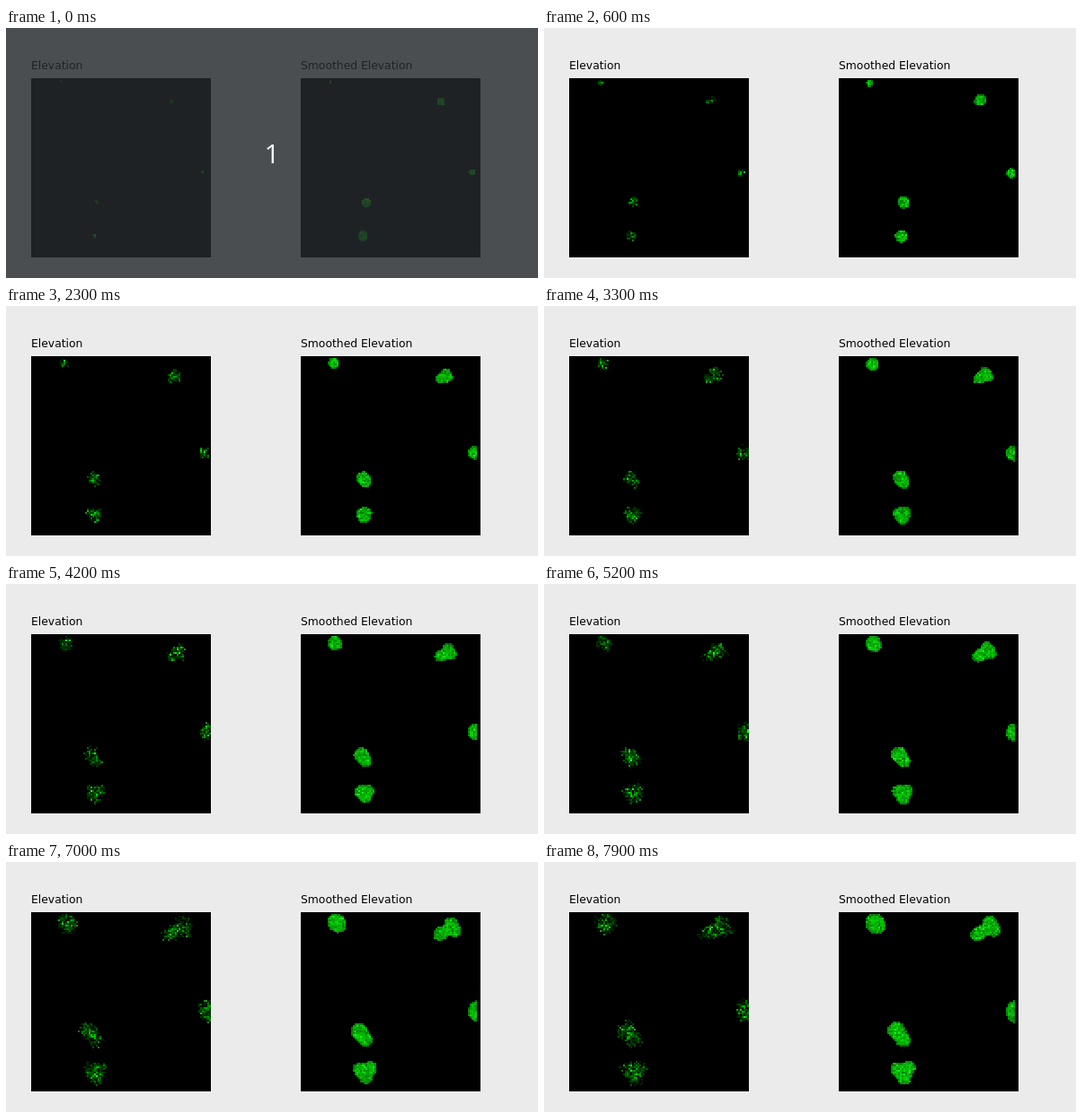
Animation, 592 px wide and 279 px high, one loop 8 s. Source, as an HTML page with a canvas:

```html
<!DOCTYPE html>
<html lang="en">
<head>
<meta charset="utf-8">
<title>Elevation</title>
<style>
  html, body { margin: 0; width: 100%; height: 100%; overflow: hidden; background: #ebebeb; }
  canvas { position: absolute; left: 0; top: 0; }
  .label {
    position: absolute; top: 34px; white-space: nowrap; color: #000;
    font: 12.35px/16px "DejaVu Sans", sans-serif;
  }
  #cover {
    position: absolute; left: 0; top: 0; width: 592px; height: 279px;
    color: #fff; text-align: center;
    font: 30px/279px "Open Sans", sans-serif;
  }
</style>
</head>
<body>
<canvas id="stage" width="592" height="279"></canvas>
<div class="label" style="left:28px">Elevation</div>
<div class="label" style="left:328px">Smoothed Elevation</div>
<div id="cover">1</div>
<script>
const ctx = document.getElementById('stage').getContext('2d');
const cover = document.getElementById('cover');
const STEP = 100, STEPS = 80, FADE_STEPS = 4, FIRST_GROWTH = 6;
const CELL = 2, SIZE = 200, TOP = 56, RAW_LEFT = 28, SMOOTH_LEFT = 328;

// Every blob starts round, then drifts, swells, and gains a long axis (stretch
// along tilt) and three corners (one of them facing point).
const blobs = [
  { from: [33, 4], to: [41, 13], size: [2, 11.4], stretch: 0.06, tilt: 0.9, corner: 0, point: 0 },
  { from: [156, 26], to: [165, 18.5], size: [5, 13.2], stretch: 0.3, tilt: 2.64, corner: 0.24, point: 2.64 },
  { from: [190.5, 105], to: [197, 111], size: [4, 11.7], stretch: 0.08, tilt: 1.57, corner: 0, point: 0 },
  { from: [73, 139], to: [67, 136], size: [5.5, 12.2], stretch: 0.28, tilt: 0.95, corner: 0.08, point: 0.95 },
  { from: [69, 176], to: [72, 178], size: [5.5, 13], stretch: 0.02, tilt: 0, corner: 0.18, point: 1.45 }
];

const lerp = (a, b, mix) => a + (b - a) * mix;

function noise(x, y, seed) {
  let h = Math.imul(x + 11, 374761393) ^ Math.imul(y + 7, 668265263) ^ Math.imul(seed + 3, 1274126177);
  h = Math.imul(h ^ (h >>> 13), 1103515245);
  h = Math.imul(h ^ (h >>> 15), 2246822519);
  return ((h ^ (h >>> 14)) >>> 0) / 4294967296;
}

function fillCell(left, x, y, green, tint) {
  ctx.fillStyle = `rgb(${tint},${Math.min(235, Math.round(green))},${tint})`;
  ctx.fillRect(left + x * CELL, TOP + y * CELL, CELL, CELL);
}

// depth is 0 at the centre of a blob and 1 on its outline.
function drawRawCell(x, y, depth, step, growth) {
  const ragged = depth / lerp(0.6, 1, Math.sqrt(growth)) + (noise(x, y, step + 200) - 0.5) * 0.5;
  const h = noise(x, y, step);
  if (ragged > 1 || h < 0.2) return;
  fillCell(RAW_LEFT, x, y, (20 + 85 * h + 130 * h ** 6) * (1.3 - 0.7 * depth), h > 0.97 ? 40 : 0);
}

function drawSmoothCell(x, y, depth, step) {
  if (depth > 1 || x > 97) return;
  const h = (noise(x, y, step + 600) + noise(x, y, step + 601)) / 2;
  fillCell(SMOOTH_LEFT, x, y, (110 + 135 * h) * (depth > 0.85 ? 0.75 : 1), h > 0.85 ? 30 : 6);
}

function drawBlob(blob, step) {
  const growth = (step / STEPS) ** 0.65;
  const [cx, cy] = blob.from.map((v, i) => lerp(v, blob.to[i], growth));
  const radius = lerp(...blob.size, growth);
  const reach = radius * 1.8;
  const cells = (center) => [
    Math.max(0, Math.floor((center - reach) / CELL)),
    Math.min(SIZE / CELL - 1, Math.ceil((center + reach) / CELL))
  ];
  const [x0, x1] = cells(cx), [y0, y1] = cells(cy);

  for (let y = Math.max(1, y0); y <= y1; y++) {
    for (let x = x0; x <= x1; x++) {
      const dx = (x + 0.5) * CELL - cx, dy = (y + 0.5) * CELL - cy;
      const angle = Math.atan2(dy, dx);
      const bulge = blob.stretch * Math.cos(2 * (angle - blob.tilt))
                  + blob.corner * Math.cos(3 * (angle - blob.point));
      const depth = Math.hypot(dx, dy) / (radius * (1 + growth * bulge));
      drawRawCell(x, y, depth, step, growth);
      drawSmoothCell(x, y, depth, step);
    }
  }
}

function draw(step) {
  ctx.fillStyle = '#ebebeb';
  ctx.fillRect(0, 0, 592, 279);
  ctx.fillStyle = '#000';
  for (const left of [RAW_LEFT, SMOOTH_LEFT]) ctx.fillRect(left, TOP, SIZE, SIZE);

  // Nothing grows until the cover is gone.
  const grown = step < FIRST_GROWTH ? 0 : step;
  for (const blob of blobs) drawBlob(blob, grown);

  const fade = Math.max(0, 1 - step / FADE_STEPS);
  cover.style.background = `rgba(39,42,46,${0.81 * fade})`;
  cover.style.color = `rgba(255,255,255,${0.95 * fade})`;
}

let start, shown = -1;
function tick(now) {
  start ??= now;
  const step = Math.floor((now - start) / STEP) % STEPS;
  if (step !== shown) draw(shown = step);
  requestAnimationFrame(tick);
}
draw(0);
requestAnimationFrame(tick);
</script>
</body>
</html>
```
